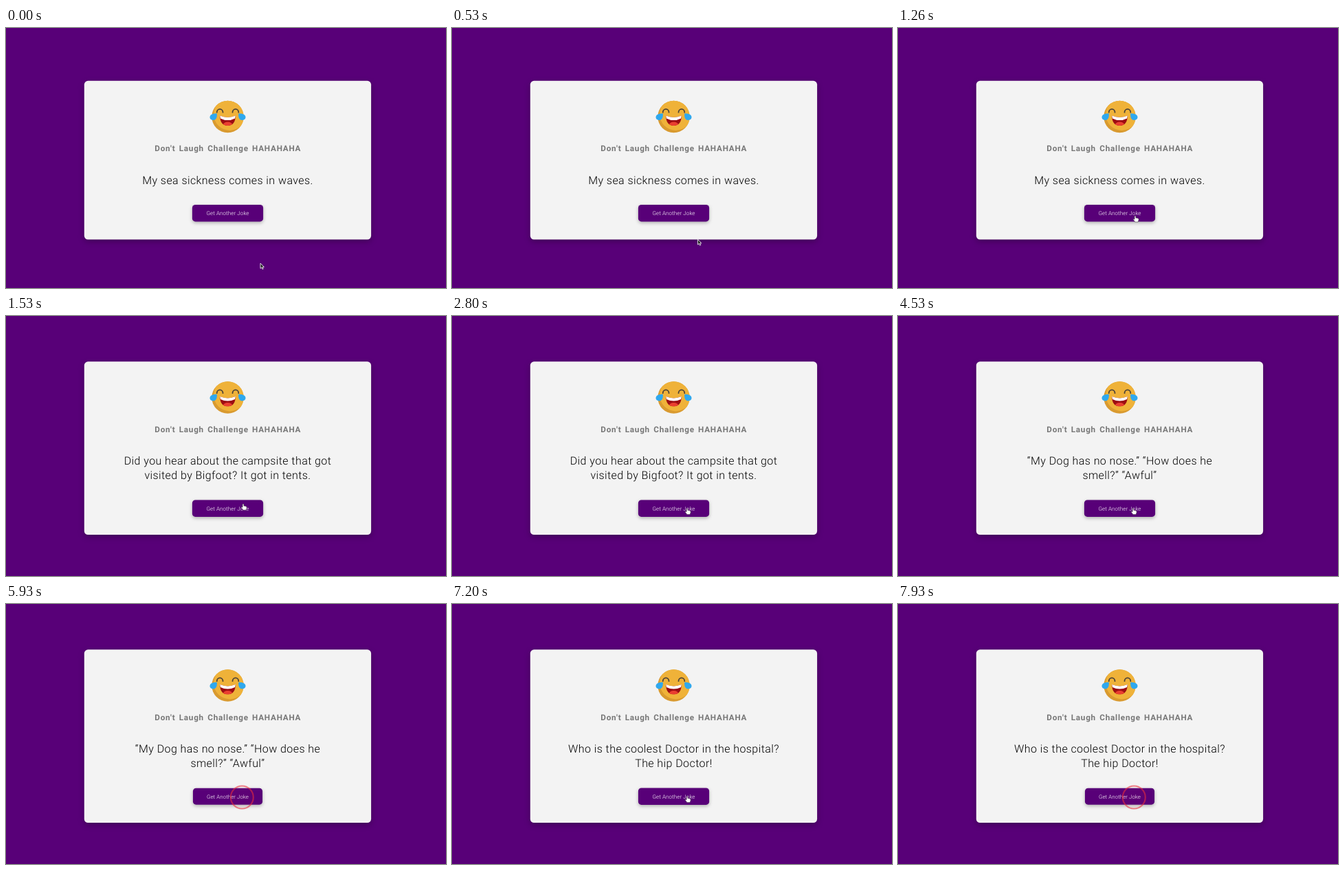
These frames come from a looping animation (640 by 378 pixels, 8000 ms). An HTML page:

```html
<!DOCTYPE html>
<html lang="en">
<head>
<meta charset="utf-8">
<title>Joke card</title>
<style>
  html, body { margin: 0; height: 100%; overflow: hidden; background: #580078; }
  svg { display: block; width: 640px; height: 378px; }
  text { font-family: Roboto, sans-serif; text-anchor: middle; text-rendering: geometricPrecision; }
  .title { font-size: 11.7px; font-weight: 700; letter-spacing: .78px; word-spacing: 1.6px; fill: #777; }
  .joke { font-size: 16px; font-weight: 300; letter-spacing: .42px; fill: #000; }
  .label { font-size: 8px; font-weight: 300; letter-spacing: .1px; fill: #fff; }
  #card { fill: #f3f3f3; filter: drop-shadow(0 3px 4px rgba(0, 0, 0, .27)); }
  #button rect { fill: #580078; filter: drop-shadow(0 2.5px 2.5px rgba(0, 0, 0, .28)); }
</style>
</head>
<body>
<svg viewBox="0 0 640 378">
  <rect id="card" x="113.8" width="417.3" rx="5.5"/>

  <g id="head">
    <g transform="translate(322.5 129)">
      <clipPath id="face"><circle r="23.2"/></clipPath>
      <circle r="23.2" fill="#d99a2f"/>
      <circle cx="3" cy="-3.5" r="23.4" fill="#efb239" clip-path="url(#face)"/>
      <g fill="none" stroke="#4f4538" stroke-width="1.8" stroke-linecap="round">
        <path d="M-15.8-6.3a4.4 4.8 0 0 1 8.8 0M7-6.3a4.4 4.8 0 0 1 8.8 0"/>
      </g>
      <clipPath id="mouth"><path d="M-11.2-1.5Q0 3.4 11.2-1.5C11.6 8 7 13 0 13S-11.6 8-11.2-1.5Z"/></clipPath>
      <g clip-path="url(#mouth)">
        <rect x="-12" y="-3" width="24" height="17" fill="#9c0d12"/>
        <ellipse cy="12.2" rx="7" ry="4.6" fill="#ea3f30"/>
        <path d="M-12-3H12L10.6 2.4Q0 7.8-10.6 2.4Z" fill="#fff"/>
      </g>
      <g fill="#2fa8ee">
        <path id="tear" d="M-15.8-4.8C-15.2-.5-16.2 4.8-21 4.9C-25 5-27 1.8-25.5-1.2C-24-4.2-20-4.8-15.8-4.8Z"/>
        <use href="#tear" transform="scale(-1 1)"/>
      </g>
    </g>
    <text class="title" x="322.8" y="179.2">Don't Laugh Challenge HAHAHAHA</text>
    <text class="joke" x="322.5" y="226.8" id="line1"></text>
    <text class="joke" x="322.5" y="247.8" id="line2"></text>
  </g>

  <g id="button">
    <rect x="-51.6" y="-12.2" width="103.2" height="24.4" rx="4.5"/>
    <text class="label" y="3">Get Another Joke</text>
  </g>

  <path id="arrow" d="M0 0V7.6L1.8 6L3 8.7L4.3 8.1L3.1 5.5H5.4Z" fill="#222" stroke="#fff" stroke-width=".8"/>
  <path id="hand" d="M-.9.8Q0-.8.9.8V3.2Q2 2.6 2.6 3.5Q3.6 3 4.1 4Q5.2 3.8 5.2 5C5.2 7 4.3 7.5 4.2 9H-.3C-.8 7.4-2.6 6.2-2.9 4.9Q-2.2 4-.9 5.3Z" fill="#fff" stroke="#333" stroke-width=".5"/>
  <circle id="ring" r="16.5" fill="#e33" fill-opacity=".03" stroke="#ec2f3c" stroke-opacity=".58" stroke-width="2.1"/>
</svg>

<script>
const LOOP = 8000, PRESS = 140, FETCH = 200;
const clicks = [1330, 3660, 5930, 7860];
const jokes = [
  ['My sea sickness comes in waves.'],
  ['Did you hear about the campsite that got', 'visited by Bigfoot? It got in tents.'],
  ['“My Dog has no nose.” “How does he', 'smell?” “Awful”'],
  ['Who is the coolest Doctor in the hospital?', 'The hip Doctor!'],
];
// Pointer moves: start, end, x, y
const moves = [
  [0, 0, 370, 342],
  [60, 1000, 345, 273],
  [1530, 1730, 346, 274],
  [1860, 2000, 345, 275],
  [2200, 2460, 343, 278],
  [2600, 2800, 342, 279.5],
];

const el = id => document.getElementById(id);
const place = (id, x, y, scale = 1) =>
  el(id).setAttribute('transform', `translate(${x} ${y}) scale(${scale})`);
const show = (id, on) => el(id).style.display = on ? '' : 'none';

function pointer(t) {
  let x = 0, y = 0;
  for (const [start, end, toX, toY] of moves) {
    const p = Math.min(1, Math.max(0, (t - start) / (end - start || 1)));
    const k = start === end ? 1 : p * p * (3 - 2 * p);
    x += (toX - x) * k;
    y += (toY - y) * k;
  }
  return [x, y];
}

function draw(now) {
  const t = now % LOOP;
  const joke = jokes[clicks.filter(c => t >= c + FETCH).length];
  const pressed = clicks.some(c => t >= c && t < c + PRESS);
  const grow = joke.length > 1 ? 10.5 : 0;
  const [x, y] = pointer(t);
  const over = y < 281;

  el('card').setAttribute('y', 76.8 - grow);
  el('card').setAttribute('height', 230.7 + 2 * grow);
  place('head', 0, -grow);
  el('line1').textContent = joke[0];
  el('line2').textContent = joke[1] || '';
  place('button', 322.5, 269.2 + grow, pressed ? .98 : 1);

  place('arrow', x, y);
  place('hand', x, y);
  place('ring', x + 1.3, y + 1.5);
  show('arrow', !over);
  show('hand', over && !pressed);
  show('ring', pressed);
  requestAnimationFrame(draw);
}
requestAnimationFrame(draw);
</script>
</body>
</html>
```
